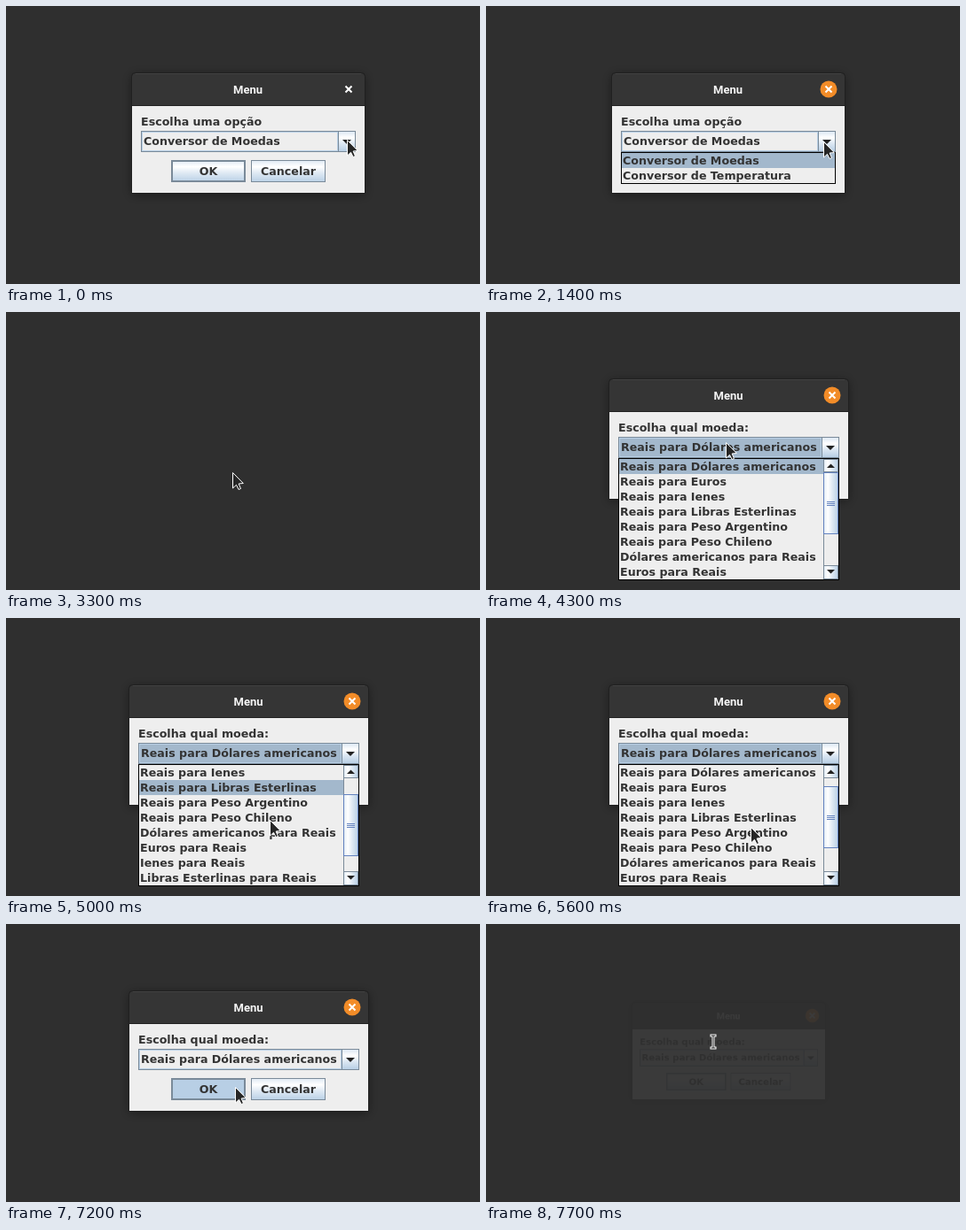
An HTML page with a canvas for the animation above (8000 ms loop, 534 by 314 pixels).

```html
<!DOCTYPE html>
<html lang="pt">
<head>
<meta charset="utf-8">
<title>Menu</title>
<style>
html, body { margin: 0; width: 100%; height: 100%; overflow: hidden; background: #2f2f2f; }
canvas { display: block; }
</style>
</head>
<body>
<canvas id="stage" width="534" height="314"></canvas>
<script>
const W = 534, H = 314, LOOP = 8000, STEP = 100;
const ROW = 17, LIST_TOP = 166, VISIBLE = 8;
const UI_FONT = 'bold 12.65px "DejaVu Sans", sans-serif';
const EDGE = '#7a8a99', SOFT = '#b8cfe5', SELECT = '#a3b8cc', PANEL = '#eeeeee', INK = '#333333';

const coins = ['Dólares americanos', 'Euros', 'Ienes', 'Libras Esterlinas', 'Peso Argentino', 'Peso Chileno'];
const menuDialog = {
  left: 142, right: 404, label: 'Escolha uma opção',
  items: ['Conversor de Moedas', 'Conversor de Temperatura']
};
const coinDialog = {
  left: 139, right: 408, label: 'Escolha qual moeda:',
  items: [...coins.map(c => 'Reais para ' + c), ...coins.map(c => c + ' para Reais')]
};

// Pointer path: time, x, y
const path = [
  [0, 384, 151], [1300, 384, 151], [1400, 380, 153], [2000, 331, 173], [2700, 331, 173],
  [3100, 256, 184], [3200, 256, 184], [3300, 255, 181], [3400, 255, 181], [4100, 270, 147],
  [4300, 270, 147], [4800, 297, 228], [5200, 297, 228], [5300, 298, 236], [5700, 298, 236],
  [6000, 292, 171], [6500, 292, 171], [7100, 258, 184], [7400, 258, 184], [7500, 265, 161],
  [7600, 265, 161], [7700, 256, 133], [LOOP, 256, 133]
];

const main = document.getElementById('stage').getContext('2d');
const layer = document.createElement('canvas');
layer.width = W;
layer.height = H;
const ghost = layer.getContext('2d');
let g = main;

function pointer(t) {
  const i = path.findIndex(k => k[0] > t);
  const [t0, x0, y0] = path[i - 1], [t1, x1, y1] = path[i];
  const p = (t - t0) / (t1 - t0);
  return { x: Math.round(x0 + (x1 - x0) * p), y: Math.round(y0 + (y1 - y0) * p) };
}

function rect(x, y, w, h, color) {
  g.fillStyle = color;
  g.fillRect(x, y, w, h);
}

function frame(x, y, w, h, color, line = 1) {
  g.strokeStyle = color;
  g.lineWidth = line;
  g.strokeRect(x + line / 2, y + line / 2, w - line, h - line);
}

function text(str, x, y, color = INK, font = UI_FONT, align = 'left') {
  g.font = font;
  g.textAlign = align;
  g.fillStyle = color;
  g.fillText(str, x, y);
}

function poly(points, color) {
  g.beginPath();
  points.forEach(([x, y]) => g.lineTo(x, y));
  g.closePath();
  g.fillStyle = color;
  g.fill();
}

function glossy(x, y, w, h, sideways) {
  const grad = sideways ? g.createLinearGradient(x, 0, x + w, 0) : g.createLinearGradient(0, y, 0, y + h);
  grad.addColorStop(0, '#dde8f3');
  grad.addColorStop(0.3, '#ffffff');
  grad.addColorStop(0.6, '#dde8f3');
  grad.addColorStop(1, SOFT);
  rect(x, y, w, h, grad);
}

function button(x, label, line, pressed) {
  if (pressed) rect(x, 174, 84, 25, SOFT);
  else glossy(x, 174, 84, 25);
  frame(x, 174, 84, 25, EDGE, line);
  text(label, x + 42, 191, INK, UI_FONT, 'center');
}

function closeButton(x, y, active) {
  if (active) {
    g.beginPath();
    g.arc(x, y, 9.5, 0, Math.PI * 2);
    g.fillStyle = '#f28c28';
    g.fill();
  }
  g.strokeStyle = '#ffffff';
  g.lineWidth = 2;
  g.beginPath();
  g.moveTo(x - 3.5, y - 3.5);
  g.lineTo(x + 3.5, y + 3.5);
  g.moveTo(x + 3.5, y - 3.5);
  g.lineTo(x - 3.5, y + 3.5);
  g.stroke();
}

function combo(left, right, value, focused) {
  rect(left, 141, right - left, 24, PANEL);
  frame(left + 1, 142, right - left - 21, 22, SOFT);
  if (focused) rect(left + 2, 143, right - left - 23, 20, SELECT);
  glossy(right - 19, 142, 18, 22);
  rect(right - 20, 141, 1, 24, EDGE);
  frame(left, 141, right - left, 24, EDGE);
  const c = right - 10;
  poly([[c - 5, 151], [c + 5, 151], [c, 156]], '#222222');
  text(value, left + 3, 157);
}

function dialog(d, { active, focused, pressed }) {
  const { left, right } = d, w = right - left;
  g.save();
  g.shadowColor = 'rgba(0,0,0,0.45)';
  g.shadowBlur = 12;
  g.shadowOffsetY = 2;
  g.beginPath();
  g.roundRect(left, 76, w, 135, [4, 4, 0, 0]);
  g.fillStyle = '#353535';
  g.fill();
  g.restore();
  g.beginPath();
  g.roundRect(left - 0.5, 75.5, w + 1, 136, [4, 4, 0, 0]);
  g.strokeStyle = '#202020';
  g.lineWidth = 1;
  g.stroke();
  rect(left + 4, 76, w - 8, 1, '#424242');
  rect(left, 112, w, 1, '#222222');
  rect(left, 113, w, 98, PANEL);
  text('Menu', (left + right) / 2 - 0.5, 99, '#f6f6f6', 'bold 13px Roboto, sans-serif', 'center');
  closeButton(right - 18, 94, active);
  text(d.label, left + 10, 135);
  combo(left + 10, right - 10, d.items[0], focused);
  button(186, 'OK', 2, pressed);
  button(276, 'Cancelar', 1);
}

function scrollBar(x, bottom, pos, total) {
  const top = LIST_TOP + 15, span = bottom - 16 - top, size = span * VISIBLE / total;
  const y = Math.round(top + span * pos / total), mid = Math.round(y + size / 2), c = x + 8.5;
  rect(x, LIST_TOP, 17, bottom - LIST_TOP, PANEL);
  glossy(x, LIST_TOP, 17, 15, true);
  glossy(x, bottom - 15, 17, 15, true);
  frame(x, LIST_TOP, 17, 15, EDGE);
  frame(x, bottom - 16, 17, 16, EDGE);
  poly([[c - 4.5, 176], [c + 4.5, 176], [c, 171.5]], '#222222');
  poly([[c - 4.5, bottom - 11], [c + 4.5, bottom - 11], [c, bottom - 6.5]], '#222222');
  rect(x, top, 1, span, EDGE);
  glossy(x, y, 17, size, true);
  frame(x, y, 17, Math.round(size), '#6382bf');
  for (let i = -1; i <= 1; i++) rect(x + 4, mid + i * 2, 9, 1, '#6382bf');
}

function popup(d, chosen, first = 0, thumb = 0) {
  const x = d.left + 10, w = d.right - d.left - 20;
  const shown = d.items.slice(first, first + VISIBLE);
  const h = shown.length * ROW, scrolls = d.items.length > VISIBLE;
  rect(x, LIST_TOP - 1, w, h + 2, PANEL);
  shown.forEach((item, i) => {
    const y = LIST_TOP + i * ROW;
    if (first + i === chosen) rect(x + 1, y, w - 2, ROW, SELECT);
    text(item, x + 2, y + 13);
  });
  if (scrolls) scrollBar(x + w - 18, LIST_TOP + h, thumb, d.items.length);
  frame(x, LIST_TOP - 1, w, h + 2, '#000000');
}

function arrow({ x, y }) {
  g.save();
  g.translate(x + 0.5, y + 0.5);
  poly([[0, 0], [0, 17.5], [4, 13.8], [6.6, 19], [9, 18], [6.6, 12.5], [11.8, 12]], '#262626');
  g.strokeStyle = '#ffffff';
  g.lineWidth = 1;
  g.stroke();
  g.restore();
}

function beam({ x, y }) {
  for (const [color, line] of [['#ffffff', 3], ['#222222', 1]]) {
    const e = line / 2 - 0.5;
    g.strokeStyle = color;
    g.lineWidth = line;
    g.beginPath();
    g.moveTo(x - 2.5 - e, y - 7);
    g.lineTo(x + 2.5 + e, y - 7);
    g.moveTo(x, y - 7);
    g.lineTo(x, y + 7);
    g.moveTo(x - 2.5 - e, y + 7);
    g.lineTo(x + 2.5 + e, y + 7);
    g.stroke();
  }
}

// The list is wheeled down four rows and back; its thumb trails by one step.
function scrollAt(t) {
  if (t < 4900) return [0, 0];
  if (t < 5300) { const n = (t - 4800) / STEP; return [n, n]; }
  const thumb = Math.max(0, Math.min(4, (5700 - t) / STEP));
  return [thumb > 1 ? thumb : 0, thumb];
}

function chosenAt(t, y) {
  if (t >= 4900 && t < 5300) return 3;
  if (t >= 5300 && t < 5800) return 8;
  return Math.max(0, Math.floor((y - LIST_TOP) / ROW));
}

function fadingDialog() {
  const cx = 273.5, cy = 143, k = 0.807;
  g = ghost;
  g.clearRect(0, 0, W, H);
  dialog(coinDialog, { active: true });
  g = main;
  g.save();
  g.globalAlpha = 0.06;
  g.translate(cx, cy);
  g.scale(k, k);
  g.drawImage(layer, -cx, -cy);
  g.restore();
}

function draw(now) {
  const t = Math.floor(now % LOOP / STEP) * STEP;
  const at = pointer(t);
  rect(0, 0, W, H, '#2f2f2f');
  if (t < 3300) {
    dialog(menuDialog, { active: t >= 400, focused: t >= 2500 && t < 3100, pressed: t >= 3100 });
    if (t >= 500 && t < 2500) popup(menuDialog, 0);
  } else if (t >= 3500 && t < 7500) {
    dialog(coinDialog, { active: true, focused: t < 7200, pressed: t === 7200 });
    if (t >= 4200 && t < 6400) popup(coinDialog, chosenAt(t, at.y), ...scrollAt(t));
  } else if (t >= 7500) {
    fadingDialog();
  }
  (t >= 7700 ? beam : arrow)(at);
  requestAnimationFrame(() => draw(performance.now()));
}

draw(performance.now());
</script>
</body>
</html>
```
